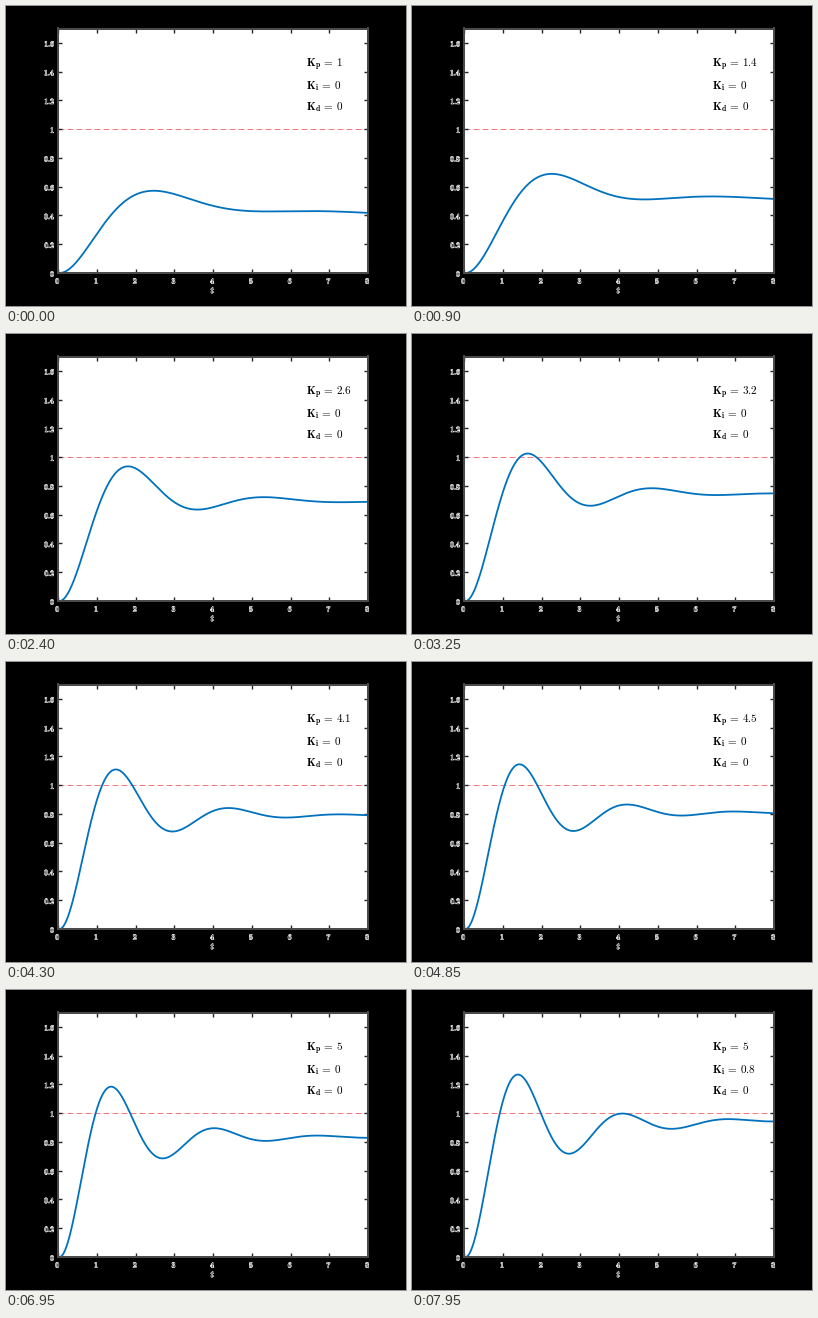
A matplotlib script that plays this animation: 400 by 300 pixels, repeating every 8 s.

```python
import numpy as np
import matplotlib as mpl
import matplotlib.pyplot as plt
from matplotlib.animation import FuncAnimation
from matplotlib.patheffects import withStroke

DPI = 100
PX = 72 / DPI            # one pixel in points
INTERVAL = 50
FRAMES = 160
STEP = 0.04              # gain change per frame
P_START, P_STEPS = 9, 99
I_START = 139
DAMPING = 1.3            # plant: y'' + 1.3 y' + y = u
LAG = 2                  # samples before the step acts
DARK = "#262626"

mpl.rcParams["mathtext.fontset"] = "cm"

T = np.linspace(0, 8, 401)


def gains(i):
    """Proportional and integral gain at frame i."""
    if i < I_START:
        return 1 + STEP * np.clip(i - P_START, 0, P_STEPS), -STEP
    return 5.0, STEP * (i - I_START)


def step_response(kp, ki):
    """Closed-loop unit step; the state is (y, y', integral of error, 1)."""
    a = np.array([[0, 1, 0, 0],
                  [-1 - kp, -DAMPING, ki, kp],
                  [-1, 0, 0, 1],
                  [0, 0, 0, 0]], float) * (T[1] - T[0])
    m = term = np.eye(4)
    for n in range(1, 9):
        term = term @ a / n
        m = m + term
    x = np.array([0, 0, 0, 1.0])
    y = np.zeros_like(T)
    for j in range(LAG, len(T)):
        y[j] = x[0]
        x = m @ x
    return y


def gain_label(name, value):
    value = max(0, round(value, 1))
    return rf"$\mathbf{{K_{{\mathbf{{{name}}}}}}}\,=\,\mathbf{{{value:g}}}$"


fig = plt.figure(figsize=(400 / DPI, 300 / DPI), dpi=DPI, facecolor="black")
ax = fig.add_axes([0.13, 0.11, 0.775, 0.815])
ax.set_xticks(range(9), [f"${v}$" for v in range(9)])
ax.set_yticks(np.arange(9) / 5, [f"${v / 5:g}$" for v in range(9)])
ax.set(xlim=(0, 8), ylim=(0, 1.7))
ax.tick_params(direction="in", top=True, right=True, length=4 * PX,
               width=1.4 * PX, color=DARK, labelsize=7.5 * PX,
               labelcolor=DARK)
ax.tick_params(axis="x", pad=3.5 * PX)
ax.tick_params(axis="y", pad=2.5 * PX)
for spine in ax.spines.values():
    spine.set(color="#4a4a4a", linewidth=2 * PX)

halo = [withStroke(linewidth=0.9 * PX, foreground="white")]
axis_name = fig.text(207 / 400, 1 - 284 / 300, "$t$", size=9 * PX,
                     color=DARK, ha="center", va="center")
for label in [*ax.get_xticklabels(), *ax.get_yticklabels(), axis_name]:
    label.set_path_effects(halo)

ax.axhline(1, color="#f47c7c", lw=PX, dashes=(6, 3), zorder=1)
curve, = ax.plot([], [], color="#0072bd", lw=1.8 * PX)
labels = [fig.text(300 / 400, 1 - y / 300, "", size=11.2 * PX, color="black",
                   va="baseline") for y in (61.5, 83, 104.5)]


def draw(i):
    kp, ki = gains(i)
    curve.set_data(T, step_response(kp, ki))
    for label, name, value in zip(labels, "pid", (kp, ki, 0)):
        label.set_text(gain_label(name, value))
    return [curve, *labels]


anim = FuncAnimation(fig, draw, frames=FRAMES, interval=INTERVAL,
                     repeat=True, repeat_delay=0)
plt.show()
```
